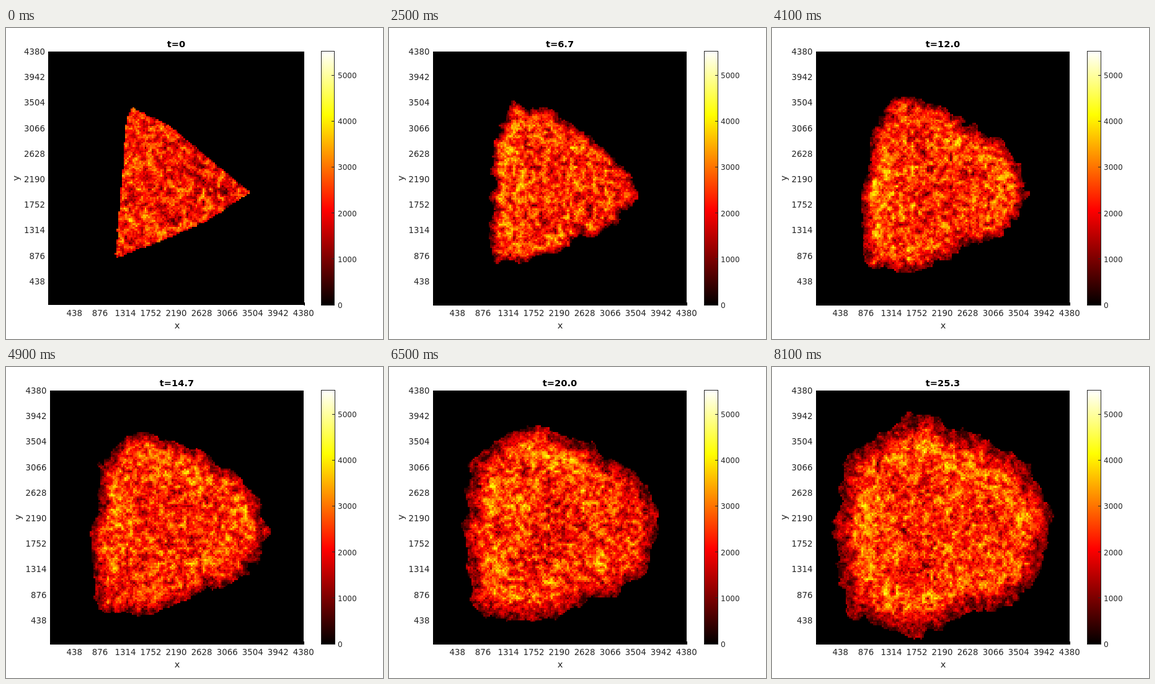
Animation, 608 px wide and 502 px high, one loop 8200 ms. Source, as an HTML page with a canvas:

```html
<!DOCTYPE html>
<html lang="en">
<head>
<meta charset="utf-8">
<title>Density map</title>
<style>
  html, body { margin: 0; width: 100%; height: 100%; overflow: hidden; background: #fff; }
  svg, canvas { position: absolute; left: 0; top: 0; }
  canvas { image-rendering: pixelated; }
  text { font-family: "DejaVu Sans", sans-serif; fill: #262626; }
</style>
</head>
<body>
<canvas id="heat" width="146" height="146"></canvas>
<svg id="plot" width="608" height="502" viewBox="0 0 608 502">
  <defs>
    <linearGradient id="hot" x1="0" y1="1" x2="0" y2="0">
      <stop offset="0" stop-color="#000"/>
      <stop offset=".375" stop-color="#f00"/>
      <stop offset=".75" stop-color="#ff0"/>
      <stop offset="1" stop-color="#fff"/>
    </linearGradient>
  </defs>
</svg>
<script>
const N = 146, LOOP = 8200, MAX = 5526, T_END = 76 / 3;
const CELL = 410 / N;
const CENTER = { x: 260, y: 255 };
const ANGLES = 720;
const svg = document.getElementById("plot");
const heat = document.getElementById("heat");
const ctx = heat.getContext("2d");
const image = ctx.createImageData(N, N);

// The colony grows from a rounded triangle into a wide blob.
const SEED_SHAPE = [[205, 129], [196, 146], [179, 372], [264, 340], [328, 311], [394, 265], [267, 160]];
const FINAL_SHAPE = [[217, 69], [285, 92], [357, 125], [410, 162], [447, 215], [455, 255], [441, 318],
  [385, 380], [310, 403], [245, 435], [170, 421], [123, 399], [106, 325], [105, 250], [117, 148], [177, 108]];

const clamp = v => Math.max(0, Math.min(1, v));
const mix = (a, b, f) => a + (b - a) * f;
const smooth = v => { v = clamp(v); return v * v * (3 - 2 * v); };

function add(tag, attrs, text = "") {
  const el = document.createElementNS("http://www.w3.org/2000/svg", tag);
  for (const key in attrs) el.setAttribute(key, attrs[key]);
  el.textContent = text;
  return svg.appendChild(el);
}

// Distance from the centre to a polygon along one direction.
function reach(shape, angle) {
  const dx = Math.cos(angle), dy = Math.sin(angle);
  let best = 0;
  shape.forEach(([px, py], k) => {
    const [qx, qy] = shape[(k + 1) % shape.length];
    const ax = px - CENTER.x, ay = py - CENTER.y, ex = qx - px, ey = qy - py;
    const det = dx * ey - dy * ex;
    const along = (ax * ey - ay * ex) / det;
    const part = (ax * dy - ay * dx) / det;
    if (part >= 0 && part <= 1) best = Math.max(best, along);
  });
  return best;
}

const radiiOf = shape =>
  Array.from({ length: ANGLES }, (_, k) => reach(shape, (k + 0.01) * 2 * Math.PI / ANGLES));
const seedRadii = radiiOf(SEED_SHAPE);
const finalRadii = radiiOf(FINAL_SHAPE);

function hash(x, y, z) {
  let h = Math.imul(x, 374761393) ^ Math.imul(y, 668265263) ^ Math.imul(z, 2147483587);
  h = Math.imul(h ^ (h >>> 13), 1274126177);
  h = Math.imul(h ^ (h >>> 15), 2246822519);
  return ((h ^ (h >>> 16)) >>> 0) / 2147483648 - 1;
}

// Random field that drifts from one state to the next with constant strength.
function drifting(x, y, time, seed) {
  const e = Math.floor(time), f = time - e;
  const sum = hash(x, y, e + seed) * (1 - f) + hash(x, y, e + 1 + seed) * f;
  return sum / Math.hypot(f, 1 - f);
}

function noise(x, y, time, seed) {
  const i = Math.floor(x), j = Math.floor(y), u = x - i, v = y - j;
  return mix(
    mix(drifting(i, j, time, seed), drifting(i + 1, j, time, seed), u),
    mix(drifting(i, j + 1, time, seed), drifting(i + 1, j + 1, time, seed), u), v);
}

const cells = Array.from({ length: N * N }, (_, k) => {
  const col = k % N, row = Math.floor(k / N);
  const x = 71 + (col + 0.5) * 409 / N, y = 38 + (row + 0.5) * CELL;
  const dx = x - CENTER.x, dy = y - CENTER.y;
  const turn = (Math.atan2(dy, dx) / (2 * Math.PI) + 1) % 1;
  return { col, row, x, y, r: Math.hypot(dx, dy), ray: Math.floor(turn * ANGLES) % ANGLES };
});

function isInside({ col, row, r, ray }, step, t) {
  const rough = clamp(t / 3);
  const lobes = mix(1.5, 4, rough) * noise(col / 3, row / 3, step / 14, 700)
    + 9 * rough * noise(col / 7, row / 7, step / 25, 900);
  return r < mix(seedRadii[ray], finalRadii[ray], t / T_END) + lobes;
}

// Distance of every cell from the empty area, swept forwards and then backwards.
function depthMap(step, t) {
  const depth = cells.map(cell => isInside(cell, step, t) ? 1e3 : 0);
  const relax = (k, s) => {
    depth[k] = Math.min(depth[k], depth[k - s] + CELL, depth[k - s * N] + CELL,
      depth[k - s * (N + 1)] + CELL * Math.SQRT2, depth[k - s * (N - 1)] + CELL * Math.SQRT2);
  };
  for (let k = N + 1; k < N * N; k++) relax(k, 1);
  for (let k = N * N - N - 2; k >= 0; k--) relax(k, -1);
  return depth;
}

function density({ col, row, x, y }, depth, step, t) {
  const rim = 5 + 1.4 * t;
  const level = mix(mix(0.65, 0.38, clamp(t / 5)), 1, smooth(depth / rim));
  const band = 330 * clamp(t / 6) * Math.exp(-(((depth - rim - 12) / 25) ** 2));
  const left = 450 * clamp(1 - t / 30) *
    Math.exp(-((x - 205 + 1.8 * t) ** 2 + (y - 245) ** 2) / 2800);
  const mean = (mix(2130, 2330, t / T_END) + band + left) * level;
  const grain = 560 * drifting(col, row, step / 3, 100)
    + 1250 * noise(col / 2.2, row / 2.2, step / 5, 300)
    + 400 * noise(col / 9, row / 9, step / 12, 500);
  return Math.max(400, mean + grain * Math.sqrt(level));
}

function drawHeat(step, t) {
  const depth = depthMap(step, t);
  cells.forEach((cell, k) => {
    const v = depth[k] ? density(cell, depth[k], step, t) / MAX : 0;
    image.data[k * 4] = 255 * clamp(v / 0.375);
    image.data[k * 4 + 1] = 255 * clamp(v / 0.375 - 1);
    image.data[k * 4 + 2] = 255 * clamp(v * 4 - 3);
    image.data[k * 4 + 3] = 255;
  });
  ctx.putImageData(image, 0, 0);
}

const title = add("text", { y: 31, "text-anchor": "middle", "font-size": 14.67, "font-weight": "bold", style: "fill:#000" });
const corner = add("rect", { y: 443, width: 1.5, height: 5, fill: "#000" });
const yName = add("text", { "text-anchor": "middle", "font-size": 14.67 }, "y");
add("text", { x: 276, y: 484.5, "text-anchor": "middle", "font-size": 14.67 }, "x");

const yTicks = [];
for (let k = 1; k <= 10; k++) {
  add("text", { x: 69.3 + 41.05 * k, y: 465.3, "text-anchor": "middle", "font-size": 13.33 }, 438 * k);
  yTicks.push(add("text", { y: 454.9 - 41.2 * k, "text-anchor": "end", "font-size": 13.33 }, 438 * k));
}

const bar = add("rect", { x: 508.5, y: 37.5, height: 410, fill: "url(#hot)", stroke: "#262626" });
const barTicks = [];
for (let k = 0; k <= 5; k++) {
  const y = 447 - k * 74.2;
  add("text", { x: 535, y: y + 4.9, "font-size": 12 }, k * 1000);
  barTicks.push(add("path", { d: `M526 ${Math.floor(y) + 0.5}h4`, stroke: "#262626" }));
}

function layout(first) {
  const left = first ? 68 : 71, right = first ? 481 : 480;
  heat.style.cssText = `left:${left}px;top:38px;width:${right - left}px;height:${first ? 409 : 410}px`;
  corner.setAttribute("x", right - 0.5);
  yName.setAttribute("transform", `translate(${first ? 21 : 24} 242.5) rotate(-90)`);
  yTicks.forEach(el => el.setAttribute("x", first ? 63 : 65.5));
  bar.setAttribute("width", first ? 21 : 22);
  barTicks.forEach(el => el.setAttribute("transform", `translate(${first ? -1 : 0} 0)`));
}

let shown = -1;
function render(ms) {
  const step = ms < 500 ? 0 : Math.floor(ms / 100) - 4;
  if (step === shown) return;
  shown = step;
  const t = Math.max(0, step - 1) / 3;
  title.textContent = "t=" + (step ? t.toFixed(1) : "0");
  title.setAttribute("x", step ? 275.5 : 274.5);
  layout(step === 0);
  drawHeat(step, t);
}

const start = performance.now();
function tick() {
  render((performance.now() - start) % LOOP);
  requestAnimationFrame(tick);
}
tick();
</script>
</body>
</html>
```
